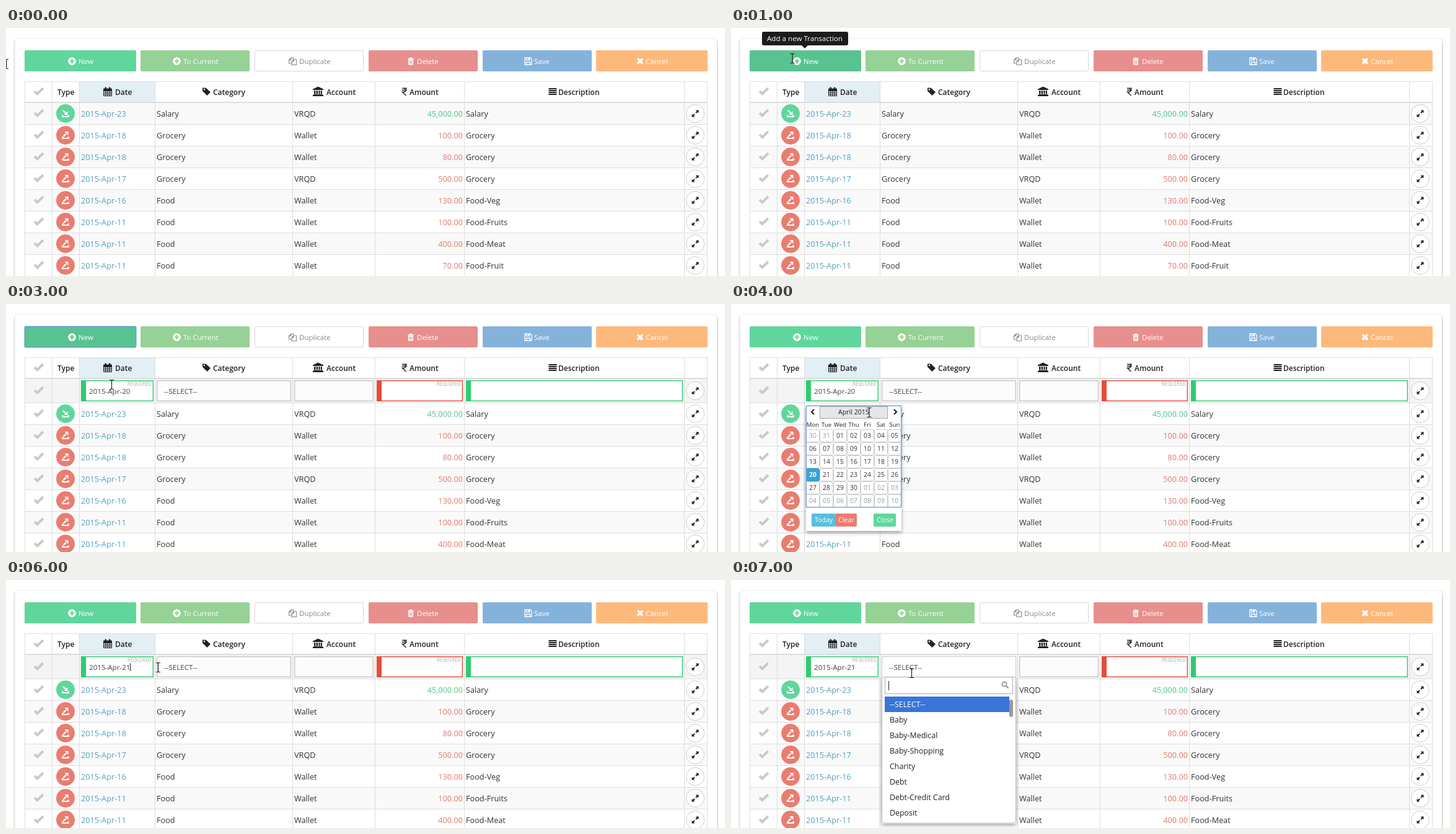
An HTML page that plays this animation: 1160x400 px, repeating every 8000 ms.

```html
<!DOCTYPE html>
<html lang="en">
<head>
<meta charset="utf-8">
<title>Transactions</title>
<style>
html, body { margin: 0; width: 100%; height: 100%; overflow: hidden; background: #fff; }
svg { display: block; width: 1160px; height: 400px; font-family: "Open Sans", "Noto Sans", sans-serif; font-size: 12.7px; }
text { white-space: pre; }
</style>
</head>
<body>
<svg id="stage" viewBox="0 0 1160 400" xmlns="http://www.w3.org/2000/svg"></svg>
<script>
const GREEN = '#60d69c', RED = '#e97d70', INK = '#333', LINE = '#ddd';
const STEP = 1000, STEPS = 8;

const rect = (x, y, w, h, fill, extra = '') =>
  `<rect x="${x}" y="${y}" width="${w}" height="${h}" fill="${fill}" ${extra}/>`;
// Rectangle with a crisp inner border
const box = (x, y, w, h, fill, stroke, lw = 1, r = 0) =>
  rect(x + lw / 2, y + lw / 2, w - lw, h - lw, fill, `stroke="${stroke}" stroke-width="${lw}" rx="${r}"`);
const text = (x, y, s, fill = INK, size = 12.7, extra = '') =>
  `<text x="${x}" y="${y}" fill="${fill}" font-size="${size}" ${extra}>${s}</text>`;
const at = (x, y, body) => `<g transform="translate(${x} ${y})">${body}</g>`;
const line = (d, color, w = 1) => `<path d="${d}" fill="none" stroke="${color}" stroke-width="${w}"/>`;
const shape = (d, fill) => `<path d="${d}" fill="${fill}" fill-rule="evenodd"/>`;
const disc = (r, fill, extra = '') => `<circle r="${r}" fill="${fill}" ${extra}/>`;
const MIDDLE = 'text-anchor="middle"', END = 'text-anchor="end"', SEMI = 'font-weight="600"', MEDIUM = 'font-weight="500"';

const icons = {
  plus: (c, bg) => disc(6.3, c) + line('M-3.7 0H3.7M0-3.7V3.7', bg, 2.2),
  copy: c => line('M-2.5-5.5H1.5V-2M-2.5-5.5L-6-2V3.5H-1M-2.5-5.5V-2H-6M1.5-2.5H6V6H-1.500V.5ZM1.500-2.500V.5H-1.500', c, 1.1),
  trash: c => shape('M-5-4.500H-2L-1.500-6H1.500L2-4.500H5V-3H-5ZM-4-2.500H4V5Q4 6 3 6H-3Q-4 6-4 5ZM-2.500-1V4.500H-1.500V-1ZM-.5-1V4.500H.5V-1ZM1.500-1V4.500H2.500V-1Z', c),
  save: c => line('M-5.500-5.500H3.500L5.500-3.500V5.500H-5.500ZM-3 5.500V1.500H3V5.500M-3-5.500V-2H2V-5.500', c, 1.3) + rect(0, -5, 1.5, 2.5, c),
  cross: c => line('M-4-4L4 4M4-4L-4 4', c, 3.2),
  check: c => line('M-7 0L-2.500 4.300L7-5', c, 4),
  calendar: c => line('M-6.500-4.500H6.500V7H-6.500ZM-6.500-1H6.500M-6.500 1.700H6.500M-6.500 4.400H6.500M-3.300-1V7M0-1V7M3.300-1V7', c) +
    rect(-6.500, -4.500, 13, 3, c) + rect(-4.500, -7, 2.5, 4, c) + rect(2, -7, 2.5, 4, c),
  tag: c => shape('M-6.500-6H-1L6.500 1L1 6.500L-6.500-1ZM-4.800-3.500A1.200 1.200 0 1 0-2.400-3.500A1.200 1.200 0 1 0-4.800-3.500Z', c),
  bank: c => shape('M0-8L8.500-4V-2.500H-8.500V-4ZM-6.500-1.500H-4V4H-6.500ZM-2.800-1.500H-.5V4H-2.800ZM.8-1.500H3V4H.8ZM4.300-1.500H6.500V4H4.300ZM-7.500 4.500H7.500V5.500H8.500V7.500H-8.500V5.500H-7.500Z', c),
  rupee: c => line('M-4-5.300H4M-4-2.300H4M-4-5.300H-2C3.500-5.300 3.500.8-2 .8H-3.500L2.500 6.500', c, 1.5),
  lines: c => line('M-6.500-4.500H6.500M-6.500-1.500H6.500M-6.500 1.500H6.500M-6.500 4.500H6.500', c, 2),
  expand: c => line('M1 -1L4-4M-1 1L-4 4', c, 2) + shape('M5.500-5.500V-.7L.7-5.500ZM-5.500 5.500V.7L-.7 5.500Z', c),
  tray: c => shape('M-6 2.500H-3.500L-2.500 4H2.500L3.500 2.500H6V6H-6Z', c),
};

const buttons = [
  [30, 180, GREEN, 'plus', 106.5, 117, 'New'],
  [217, 176, '#96d195', 'plus', 275.5, 286, 'To Current'],
  [401, 176, '#fff', 'copy', 462.5, 473, 'Duplicate'],
  [585, 176, '#e78f8d', 'trash', 653, 663, 'Delete'],
  [769, 176, '#85b2db', 'save', 842.5, 852, 'Save'],
  [952, 180, '#fdb97c', 'cross', 1023, 1032, 'Cancel'],
];
const edges = [30, 74, 118, 240, 462, 595, 739, 1094, 1131];
const headers = [
  ['calendar', 164, 176, 'Date'], ['tag', 323.5, 334, 'Category'], ['bank', 503.5, 517, 'Account'],
  ['rupee', 643, 651, 'Amount'], ['lines', 882, 891, 'Description'],
];
const rows = [
  ['23', 'Salary', 'VRQD', '45,000.00', 'Salary'],
  ['18', 'Grocery', 'Wallet', '100.00', 'Grocery'],
  ['18', 'Grocery', 'Wallet', '80.00', 'Grocery'],
  ['17', 'Grocery', 'VRQD', '500.00', 'Grocery'],
  ['16', 'Food', 'Wallet', '130.00', 'Food-Veg'],
  ['11', 'Food', 'Wallet', '100.00', 'Food-Fruits'],
  ['11', 'Food', 'Wallet', '400.00', 'Food-Meat'],
  ['11', 'Food', 'Wallet', '70.00', 'Food-Fruit'],
];
const options = ['--SELECT--', 'Baby', 'Baby-Medical', 'Baby-Shopping', 'Charity', 'Debt', 'Debt-Credit Card', 'Deposit'];

const shadow = (id, dy, blur, alpha) =>
  `<filter id="${id}" x="-10%" y="-10%" width="120%" height="120%"><feDropShadow dx="0" dy="${dy}" stdDeviation="${blur}" flood-opacity="${alpha}"/></filter>`;
const defs = `<defs>${shadow('panelShadow', 1, 1.6, 0.5)}${shadow('popShadow', 3, 3, 0.35)}</defs>`;

function toolbar(newState) {
  return buttons.map(([x, w, color, icon, ix, tx, label], i) => {
    const plain = color === '#fff', ink = plain ? '#888' : '#fff';
    const fill = i === 0 && newState ? '#58c390' : color;
    let s = plain ? box(x, 36, w, 34, fill, '#d8d8d8', 1, 1) : rect(x, 36, w, 34, fill, 'rx="2"');
    if (i === 0 && newState === 'pressed') s += line('M31 70V37.500H209V70', 'rgba(0,60,40,.16)', 3) + line('M31 40H209', 'rgba(0,60,40,.07)', 3);
    if (i === 0 && (newState === 'pressed' || newState === 'focus')) s += box(29.5, 35.5, 181, 35, 'none', '#5b9fd0', 1.4, 2);
    return s + at(ix, 53.5, icons[icon](ink, fill)) + text(tx, 58, label, ink, 11.5, plain ? '' : MEDIUM);
  }).join('');
}

function expandButton(y) {
  return at(1112, y, disc(14.5, '#fff', 'stroke="#ccc"') + icons.expand('#222'));
}

function typeBadge(y, income) {
  const arrow = income
    ? line('M-4-5L0-1', '#fff', 2.4) + shape('M3.500 2V-4L-2.500 2Z', '#fff')
    : line('M-3.500 2L1-2.500', '#fff', 2.4) + shape('M4.500-6V0L-1.500-6Z', '#fff');
  return at(96, y, disc(15, income ? GREEN : RED) + arrow + icons.tray('#fff'));
}

function dataRow([day, category, account, amount, note], i, editing) {
  const top = 121 + i * 35 + (editing ? 39 : 0), mid = top + 17, base = top + 22;
  const income = i === 0;
  return rect(31, top, 1100, 34, (i + editing) % 2 ? '#fff' : '#f9f9f9') + rect(30, top + 34, 1102, 1, LINE) +
    at(53, mid - 1, icons.check('#c9c9c9')) + typeBadge(mid, income) +
    text(121, base, '2015-Apr-' + day, '#559fc1') + text(243, base, category) + text(465, base, account) +
    text(737, base, amount, income ? '#4fc78b' : '#e8776a', 12.7, END) + text(742, base, note) + expandButton(mid);
}

function field(x, w, color) {
  return color ? box(x, 123, w, 34, '#fff', color, 1.4) + rect(x, 123, 8, 34, color)
    : box(x, 123, w, 34, '#fcfcfc', '#ccc', 1.5);
}

function editRow(date) {
  const required = x => text(x, 132, 'REQUIRED', '#b5b5b5', 8, 'font-family="DejaVu Sans Mono, monospace"');
  return rect(31, 121, 1100, 38, '#f4f4f4') + rect(30, 159, 1102, 1, LINE) +
    at(53, 139, icons.check('#c9c9c9')) +
    field(121, 117, '#2ecc71') + required(196) + text(134, 145, date, '#444', 11.6) +
    field(243, 217) + text(255, 145, '--SELECT--', '#444', 11.6) + field(465, 128) +
    field(598, 139, '#e74c3c') + required(695) + field(742, 350, '#2ecc71') + expandButton(140);
}

function table(editing, date) {
  const head = rect(30, 86, 1102, 1, LINE) + rect(119, 87, 121, 32, '#e2eff5') + rect(30, 119, 1102, 2, LINE) +
    at(53, 102, icons.check('#c9c9c9')) + text(83, 108, 'Type', '#222', 12, SEMI) +
    headers.map(([icon, ix, tx, label]) => at(ix, 102.5, icons[icon]('#222')) + text(tx, 108, label, '#222', 12, SEMI)).join('');
  return head + (editing ? editRow(date) : '') + rows.map((r, i) => dataRow(r, i, editing)).join('') +
    edges.map(x => editing
      ? rect(x, 86, 1, 314, LINE)
      : rect(x, 86, 1, 314, LINE)).join('');
}

function calendar(overTitle) {
  let s = rect(121, 164, 154, 202, '#fff', 'filter="url(#popShadow)"');
  s += overTitle ? box(143, 165, 110, 20, '#e6e6e6', '#aaa') : box(143, 165, 110, 20, '#fff', '#ddd');
  s += line('M134 170L130 174L134 178M263 170L267 174L263 178', '#222', 2.2) +
    text(198, 178, 'April 2015', '#222', 10.6, `${MIDDLE} ${MEDIUM}`);
  ['Mon', 'Tue', 'Wed', 'Thu', 'Fri', 'Sat', 'Sun'].forEach((d, i) => {
    s += text(132 + i * 22, 198, d, '#222', 9.6, `${MIDDLE} ${MEDIUM}`);
  });
  for (let i = 0; i < 42; i++) {
    const x = 121 + i % 7 * 22, y = 202 + Math.floor(i / 7) * 21;
    const date = new Date(2015, 2, 30 + i), day = date.getDate(), inMonth = date.getMonth() === 3;
    const selected = inMonth && day === 20, hover = inMonth && day === 21 && !overTitle;
    s += box(x, y, 22, 21, selected ? '#34a5d1' : hover ? '#e2e2e2' : '#fff', selected ? '#2e97c2' : '#ccc', 1, 2) +
      text(x + 11, y + 14, String(day).padStart(2, '0'), selected ? '#fff' : inMonth ? INK : '#999', 10.3,
        MIDDLE + (selected ? ' font-weight="700"' : ''));
  }
  s += box(120.5, 163.5, 155, 165, 'none', '#79a7e3', 1.6, 1);
  [[130, 38, '#56bfe0', 'Today'], [168, 35, RED, 'Clear'], [230, 36, GREEN, 'Close']].forEach(([x, w, c, label]) => {
    s += rect(x, 338, w, 21, c, 'rx="2"') + text(x + w / 2 + 0.5, 352, label, '#fff', 10.6, `${MIDDLE} ${MEDIUM}`);
  });
  return s;
}

function dropdown() {
  return rect(243, 157, 217, 236, '#fff', 'rx="3" filter="url(#popShadow)"') +
    box(243, 123, 217, 269.5, '#fff', '#b5b5b5', 1, 3) + box(243, 123, 217, 34, '#fff', '#ccc') +
    text(255, 145, '--SELECT--', '#444', 11.6) +
    box(248, 156, 207, 28, '#fff', '#aaa') + rect(254, 163, 1, 15, '#222') +
    at(441, 168, disc(3.6, 'none', 'stroke="#999" stroke-width="2"') + line('M2.500 2.500L6.500 6.500', '#999', 2.4)) +
    rect(248, 188, 201, 25, '#3875d7') + rect(449, 193, 6, 28, '#999', 'rx="3"') +
    options.map((o, i) => text(256, 205 + i * 25, o, i ? '#222' : '#fff', 12.4)).join('');
}

const tooltip = () => rect(50, 6, 139, 22, '#1c1c1c', 'rx="3"') + shape('M114 28H124L119 33Z', '#1c1c1c') +
  text(119, 21, 'Add a new Transaction', '#fff', 11.6, `${MIDDLE} ${MEDIUM}`);

const cursor = (x, y) => at(x, y, line('M-3.500-7.500H-1L0-6.500L1-7.500H3.500M0-6.500V6.500M-3.500 7.500H-1L0 6.500L1 7.500H3.500', '#222', 1.2));

const pointer = [[0.5, 58], [99, 49], [99, 49], [170.5, 130], [223, 175], [155, 276], [245.5, 141], [291.5, 150]];
const newStates = ['', 'hover', 'pressed', 'focus'];

function draw(step) {
  const editing = step >= 3 ? 1 : 0;
  return defs + rect(14.5, 17.5, 1132.5, 420, '#fff', 'rx="5" filter="url(#panelShadow)"') +
    toolbar(newStates[step]) + table(editing, step >= 6 ? '2015-Apr-21' : '2015-Apr-20') +
    (step === 1 || step === 2 ? tooltip() : '') +
    (step === 4 || step === 5 ? calendar(step === 4) : '') +
    (step === 6 ? rect(200, 134, 1, 13, '#222') : '') +
    (step === 7 ? dropdown() : '') + cursor(...pointer[step]);
}

const stage = document.getElementById('stage');
let shown = -1;
function tick() {
  const step = Math.floor(performance.now() / STEP) % STEPS;
  if (step !== shown) stage.innerHTML = draw(shown = step);
  requestAnimationFrame(tick);
}
tick();
</script>
</body>
</html>
```
